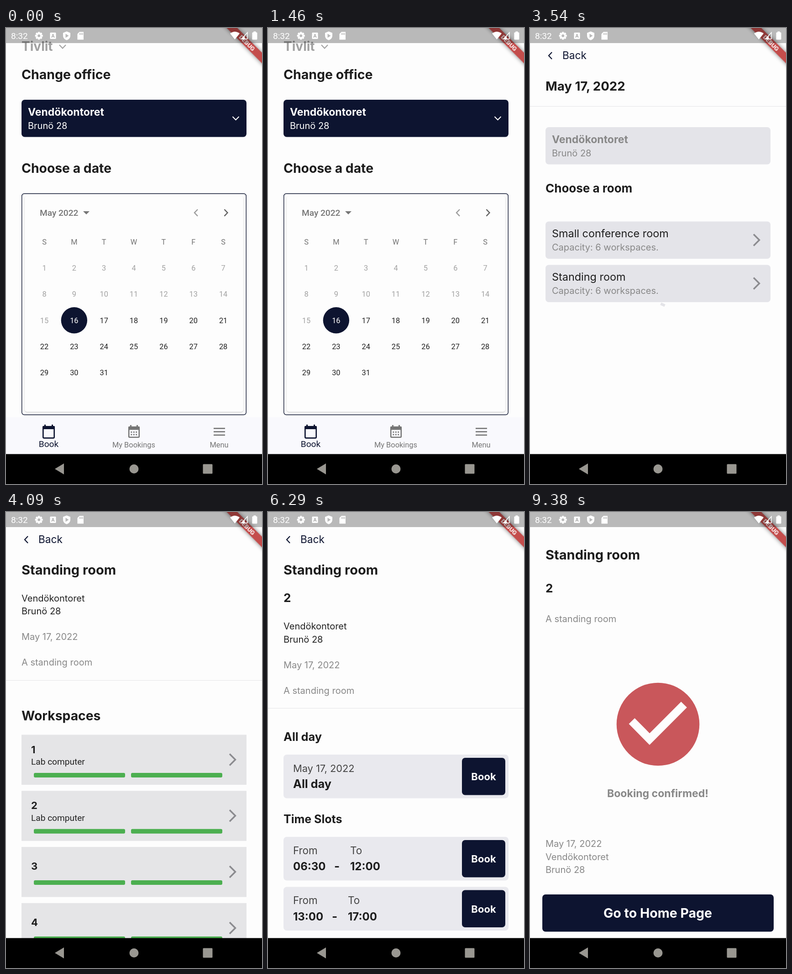
Animation, 561 px wide and 998 px high, one loop 9.42 s. Source, as an HTML page:

```html
<!DOCTYPE html>
<html lang="en">
<head>
<meta charset="utf-8">
<title>Desk booking</title>
<style>
  html, body { margin: 0; width: 100%; height: 100%; overflow: hidden; background: #fdfdfd; }
  svg { display: block; width: 100%; height: 100%; font-family: Inter, "Open Sans", sans-serif; }
  .rb { font-family: Roboto, "Noto Sans", sans-serif; }
  .b { font-weight: 700; }
  .m { font-weight: 500; }
  .mid { text-anchor: middle; }
  .line { fill: none; }

  /* Incoming screens slide up with a fast-out-slow-in curve while fading with ease-in. */
  .page { animation: 9420ms infinite both; animation-timing-function: cubic-bezier(.4, 0, .2, 1), ease-in; }
  #rooms { animation-name: rooms-slide, rooms-fade; }
  #spaces { animation-name: spaces-slide, spaces-fade; }
  #slots { animation-name: slots-slide, slots-fade; }
  #done { animation-name: done-slide, done-fade; }

  @keyframes rooms-slide { 0%, 21.699% { transform: translateY(233px); } 24.883%, 100% { transform: none; } }
  @keyframes rooms-fade { 0%, 21.699% { opacity: 0; } 24.883%, 100% { opacity: 1; } }
  @keyframes spaces-slide { 0%, 39.278% { transform: translateY(233px); } 42.463%, 100% { transform: none; } }
  @keyframes spaces-fade { 0%, 39.278% { opacity: 0; } 42.463%, 100% { opacity: 1; } }
  @keyframes slots-slide { 0%, 54.745% { transform: translateY(233px); } 57.93%, 100% { transform: none; } }
  @keyframes slots-fade { 0%, 54.745% { opacity: 0; } 57.93%, 100% { opacity: 1; } }
  @keyframes done-slide { 0%, 72.006% { transform: translateY(233px); } 75.191%, 100% { transform: none; } }
  @keyframes done-fade { 0%, 72.006% { opacity: 0; } 75.191%, 100% { opacity: 1; } }

  .before { animation: before 9420ms step-end infinite; }
  .after { animation: after 9420ms step-end infinite; }
  @keyframes before { 0% { opacity: 1; } 21.3%, 100% { opacity: 0; } }
  @keyframes after { 0% { opacity: 0; } 21.3%, 100% { opacity: 1; } }
  .ripple { transform-box: fill-box; transform-origin: center; animation: ripple 9420ms infinite; }
  @keyframes ripple {
    0%, 20.8% { transform: scale(.4); opacity: 0; }
    21.3% { transform: scale(.85); opacity: 1; }
    23.4%, 25% { transform: none; opacity: 1; }
    26%, 100% { transform: none; opacity: 0; }
  }
</style>
</head>
<body>
<svg id="stage" viewBox="0 0 561 998"></svg>
<script>
const NAVY = '#0d1430', INK = '#1d1d1d', GREY = '#888', TAB = '#757575', PAPER = '#fdfdfd', PANEL = '#e4e4e9';
const OFFICE = 'Vendökontoret', STREET = 'Brunö 28', DATE = 'May 17, 2022', ROOM = 'Standing room';

const text = (x, y, size, str, fill = INK, cls = '') =>
  `<text x="${x}" y="${y}" font-size="${size}" fill="${fill}" class="${cls}">${str}</text>`;
const bold = (x, y, size, str, fill = INK, cls = '') => text(x, y, size, str, fill, 'b ' + cls);
const rect = (x, y, w, h, fill, r = 0, extra = '') =>
  `<rect x="${x}" y="${y}" width="${w}" height="${h}" rx="${r}" fill="${fill}" ${extra}/>`;
const circle = (x, y, r, fill, extra = '') => `<circle cx="${x}" cy="${y}" r="${r}" fill="${fill}" ${extra}/>`;
const line = (d, color, width) => `<path class="line" d="${d}" stroke="${color}" stroke-width="${width}"/>`;
const shape = (d, fill) => `<path d="${d}" fill="${fill}" fill-rule="evenodd"/>`;
const page = (id, body) => `<g id="${id}" class="page">${rect(0, 0, 561, 1240, PAPER)}${body}</g>`;

const back = line('M48 53l-7 7.5 7 7.5', NAVY, 2.2) + text(71, 68, 22.6, 'Back', NAVY);
const divider = y => rect(0, y, 561, 1, '#e4e4e6');
const next = y => line(`M490 ${y - 12.5}l12.5 12.5 -12.5 12.5`, '#8b8b8f', 3.5);
const address = (y, fill = '#222') => text(34, y, 20, OFFICE, fill) + text(34, y + 28.7, 20, STREET, fill);

function calendar() {
  const colX = i => 84 + 65.35 * i, rowY = i => 525 + 57.35 * i;
  const [x16, x17, y] = [colX(1), colX(2), rowY(2)];
  const cell = (x, y, str, fill, cls = '') => text(x, y + 6, 16.4, str, fill, 'rb mid ' + cls);
  let out = [...'SMTWTFS'].map((d, i) => cell(colX(i), 468, d, '#737373')).join('');
  for (let d = 1; d <= 31; d++) {
    if (d === 16 || d === 17) continue;
    out += cell(colX((d - 1) % 7), rowY(Math.floor((d - 1) / 7)), d, d < 16 ? '#a2a2a2' : '#222');
  }
  out += `<g class="before">${circle(x16, y, 28.7, NAVY)}${cell(x16, y, 16, '#fff')}${cell(x17, y, 17, '#222')}</g>`;
  out += circle(x17, y, 33.5, '#ececee', 'class="ripple"');
  out += `<g class="after">${circle(x16, y, 28, 'none', `stroke="${NAVY}" stroke-width="1.4"`)}
    ${cell(x16, y, 16, NAVY)}${circle(x17, y, 28.7, NAVY)}${cell(x17, y, 17, '#fff')}</g>`;
  return out;
}

function tabs() {
  const dots = [0, 1, 2, 3, 4, 5].map(i => rect(273.5 + (i % 3) * 5.4, 883 + (i > 2) * 5.5, 2.8, 2.8, TAB)).join('');
  return rect(0, 852, 561, 81, '#f9f9fd') +
    rect(81.3, 872.3, 24.4, 25, 'none', 2, `stroke="${NAVY}" stroke-width="2.7"`) +
    rect(80, 871, 27, 7, NAVY, 2) + rect(84, 868, 3, 5, NAVY) + rect(100, 868, 3, 5, NAVY) +
    rect(269.2, 873.2, 22.6, 22.6, 'none', 2, `stroke="${TAB}" stroke-width="2.6"`) +
    rect(268, 872, 25, 7.5, TAB, 2) + rect(272, 869, 3, 5, TAB) + rect(286, 869, 3, 5, TAB) + dots +
    [875, 882.3, 889.6].map(y => rect(455, y, 25, 2.6, TAB)).join('') +
    text(93.5, 917, 19.1, 'Book', NAVY, 'rb mid') +
    text(280, 918, 16.4, 'My Bookings', TAB, 'rb mid') +
    text(467, 918, 16.4, 'Menu', TAB, 'rb mid');
}

const home = bold(34, 50, 28, 'Tivlit', '#a0a0a0') + line('M117 37l7 7.5 7 -7.5', '#a0a0a0', 2.2) +
  bold(34, 111.5, 28.5, 'Change office') +
  rect(34, 157, 493, 81.5, NAVY, 7) + bold(48, 192, 23, OFFICE, '#fff') + text(48, 220.5, 20, STREET, '#fff') +
  line('M496.5 194l7 7 7 -7', '#fff', 2) +
  bold(34, 316.5, 28.3, 'Choose a date') +
  rect(34.7, 362.5, 491.6, 484, PAPER, 5.5, `stroke="${NAVY}" stroke-width="1.4"`) +
  rect(41, 368, 479, 472, PAPER, 5, 'style="filter:drop-shadow(0 1px 1px rgba(0,0,0,.25))"') +
  text(74, 411, 19.1, 'May 2022', TAB, 'rb m') + shape('M169 401h14l-7 7z', TAB) +
  line('M420 397l-7 7.3 7 7.3', '#9c9c9c', 2.4) + line('M478.5 397l7 7.3 -7 7.3', '#606060', 2.4) +
  calendar() + tabs();

const roomCard = (y, name) => rect(34, y, 493, 81.5, PANEL, 7) + text(48, y + 34.5, 23.4, name) +
  text(48, y + 63, 20, 'Capacity: 6 workspaces.', GREY) + next(y + 40.5);
const rooms = back + bold(34, 136.5, 27.6, DATE) + divider(171) +
  rect(34, 217, 493, 81.5, PANEL, 7) + bold(48, 252, 23, OFFICE, GREY) + text(48, 280.5, 20, STREET, GREY) +
  bold(34, 360, 26, 'Choose a room') + roomCard(423.5, 'Small conference room') + roomCard(518.5, ROOM) +
  rect(286, 602.5, 10, 6, '#e4e4e8', 0, 'transform="rotate(25 291 605.5)"');

function spaceRow(i) {
  const y = 487.5 + 122.8 * i, equipped = i < 2, barY = y + (equipped ? 83.5 : 73);
  return rect(34, y, 493, 109.5, '#e5e5e7') + bold(55, y + (equipped ? 40 : 50), 22, i + 1) +
    (equipped ? text(55, y + 65.5, 19.1, 'Lab computer', '#222', 'rb') : '') +
    rect(61, barY, 200, 10, '#4caf50', 3) + rect(274, barY, 200, 10, '#4caf50', 3) + next(y + 54.5);
}
const spaces = back + bold(34, 136.5, 29, ROOM) + address(195.5) +
  text(34, 280, 20, DATE, GREY) + text(34, 336, 20, 'A standing room', GREY) + divider(368) +
  bold(34, 455.5, 28.3, 'Workspaces') + [0, 1, 2, 3].map(spaceRow).join('');

const bookCard = (y, body) => rect(34, y, 493, 95.5, '#e9e9ee', 7) +
  rect(425, y + 7, 95, 81.5, NAVY, 7) + bold(472.5, y + 56, 22, 'Book', '#fff', 'mid') + body;
const slotCard = (y, from, to, toX) => bookCard(y,
  text(55, y + 37.5, 22.4, 'From', '#444') + text(toX, y + 37.5, 22.4, 'To', '#444') +
  bold(55, y + 73, 24, from) + bold(toX - 35, y + 73, 26, '-') + bold(toX, y + 73, 24, to));
const slots = back + bold(34, 136.5, 29, ROOM) + bold(34, 197, 26, '2') + address(257) +
  text(34, 341.5, 20, DATE, GREY) + text(34, 397.5, 20, 'A standing room', GREY) + divider(429) +
  bold(34, 501, 25.3, 'All day') +
  bookCard(531, text(55, 568.5, 21.8, DATE, '#444') + bold(55, 604, 25.3, 'All day')) +
  bold(34, 681, 25, 'Time Slots') + slotCard(711, '06:30', '12:00', 180) + slotCard(820.5, '13:00', '17:00', 175);

const done = bold(34, 103.5, 29, ROOM) + bold(34, 175.5, 26, '2') + text(34, 240.5, 20, 'A standing room', GREY) +
  circle(280.5, 464.5, 90.8, '#c9575b') + line('M223 457.5l39 39.5 75.5 -75.5', PAPER, 18) +
  bold(280, 624, 23.1, 'Booking confirmed!', GREY, 'mid') +
  text(34, 733, 20, DATE, GREY) + address(761.5, GREY) +
  rect(27, 837, 507, 81.5, NAVY, 7) + bold(280, 887.5, 28.5, 'Go to Home Page', '#fff', 'mid');

const banner = `<g transform="translate(561 0) rotate(45)">
  <g style="filter:drop-shadow(0 0 5px rgba(0,0,0,.5))">${rect(-70, 38.2, 140, 16.4, '#c44d4c')}</g>
  ${text(0, 51.4, 13.5, 'DEBUG', '#fff', 'rb b mid')}</g>`;

const teeth = [0, 45, 90, 135].map(a => rect(70, 8.5, 4.4, 17, '#fff', 1, `transform="rotate(${a} 72.2 17)"`)).join('');
const statusBar = rect(0, 0, 561, 33, '#000', 0, 'opacity=".265"') +
  text(11, 24, 19.1, '8:32', '#fff', 'rb') +
  teeth + circle(72.2, 17, 6, '#fff') + circle(72.2, 17, 3, '#bababa') +
  rect(96.5, 10, 13, 14, '#fff', 1.5) + text(103, 21, 11, 'A', '#aaa', 'rb b mid') +
  shape('M133 7.5l8 3.2v6q0 7 -8 10q-8 -3 -8 -10v-6zM130.5 12.5v9l7 -4.5z', '#fff') +
  shape('M161 8.5h9v17h-13.5v-12.5zM161 11h1.6v4h-1.6zM164 11h1.6v4h-1.6zM167 11h1.6v4h-1.6z', '#fff') +
  shape('M491 12q11 -8 21 0l-10.5 13z', '#fff') +
  line('M529 10v14h-13z', '#fff', 1.5) + shape('M523 17v7.5h-7z', '#fff') +
  rect(539.5, 9.5, 11, 16, '#fff', 1.5) + rect(542.5, 7.5, 5, 3, '#fff');

const systemNav = rect(0, 932.5, 561, 66, '#000') + shape('M107 965l20 -12v24z', '#999791') +
  circle(280.5, 965, 10, '#999791') + rect(431.5, 954.5, 21, 21, '#999791', 1.5);

document.getElementById('stage').innerHTML = rect(0, 0, 561, 998, PAPER) + home +
  page('rooms', rooms) + page('spaces', spaces) + page('slots', slots) + page('done', done) +
  banner + statusBar + systemNav;
</script>
</body>
</html>
```
